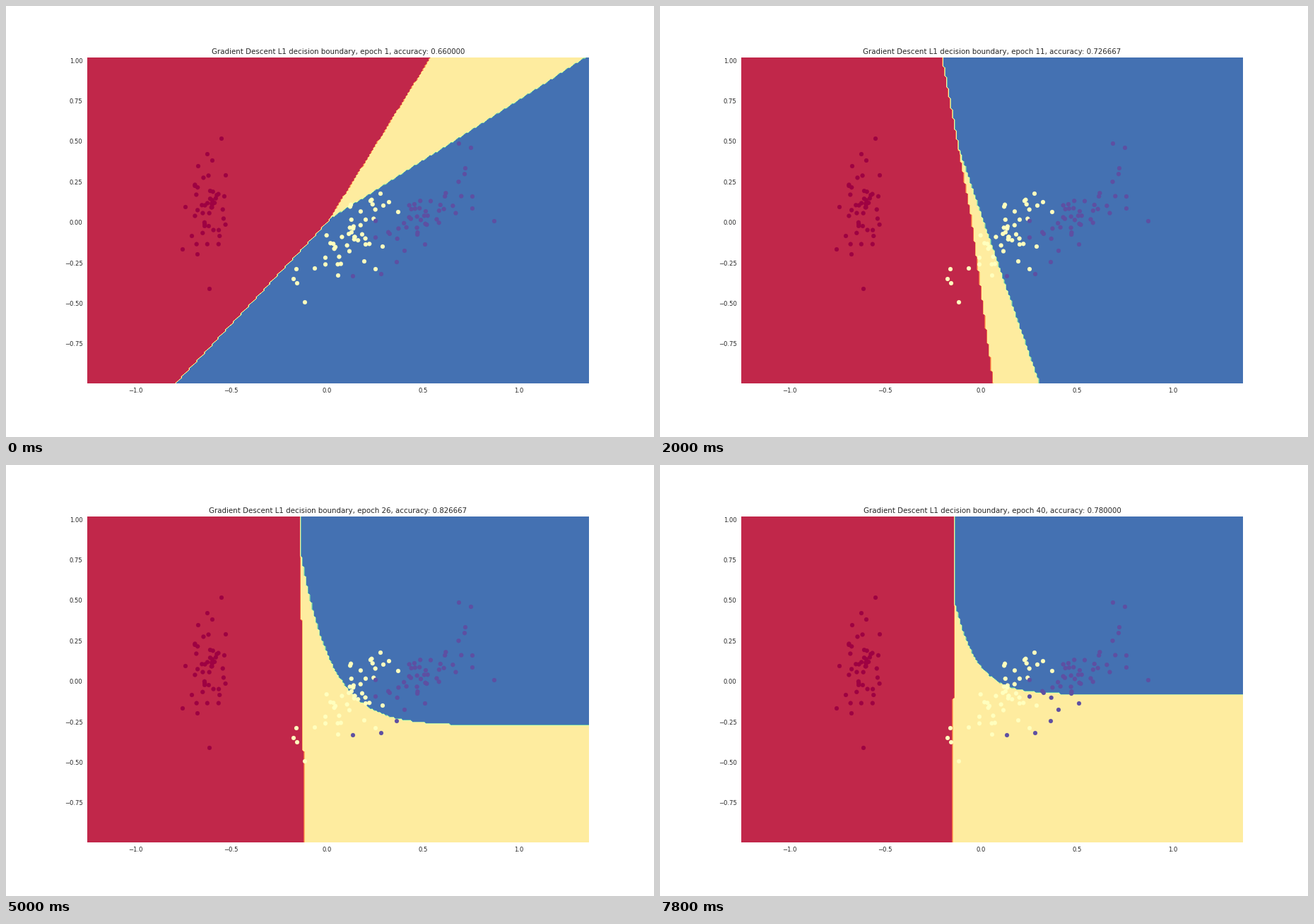
Recreate the animation shown at these times as a matplotlib script. Size 917x611 px, loop 8 s.

```python
import numpy as np
import matplotlib.pyplot as plt
from matplotlib.animation import FuncAnimation

W, H, DPI = 917, 611, 100
INK = "0.15"


def pt(px):
    return px * 72 / DPI


# Mesh in data units; the stage is ZERO + SCALE * data, y downwards
X = -1.2525 + 0.01 * np.arange(263)
Y = -0.9934 + 0.01 * np.arange(202)
LEFT, WIDTH, BOTTOM, HEIGHT = 0.125, 0.775, 0.125, 0.755
SCALE = np.array([W * WIDTH / (X[-1] - X[0]), -H * HEIGHT / (Y[-1] - Y[0])])
ZERO = np.array([W * LEFT, H * (1 - BOTTOM)]) - SCALE * [X[0], Y[0]]
MX = ZERO[0] + SCALE[0] * X
MY = ZERO[1] + SCALE[1] * Y
TOP, MIDDLE, BASE = 73, 306, 534

rng = np.random.default_rng(4)


def cluster(centre, spread, tilt, outliers, size=50):
    """A tilted Gaussian cloud plus its outlying samples, in stage pixels."""
    a, b = rng.normal(size=(2, size - len(outliers))).clip(-1.8, 1.8)
    cloud = np.column_stack([a, tilt * a + np.sqrt(1 - tilt ** 2) * b])
    return np.vstack([outliers, centre + cloud * spread])


CLASSES = [
    cluster((289, 289), (12, 27), 0, [
        (305, 188), (285, 210), (292, 219), (272, 227), (311, 240),
        (254, 285), (263, 326), (250, 345), (271, 352), (288, 401)]),
    cluster((489, 318), (25, 27), -0.65, [
        (530, 266), (542, 278), (555, 292), (533, 341), (507, 362),
        (523, 373), (437, 372), (411, 373), (407, 387), (412, 393),
        (423, 420), (470, 382)]),
    cluster((586, 296), (35, 24), -0.8, [
        (641, 195), (658, 201), (650, 230), (660, 270), (660, 287),
        (691, 305), (593, 338), (564, 347), (553, 363), (531, 380),
        (491, 383)])]

# State of the classifier at some epochs: correct samples,
# red edge at TOP, MIDDLE and BASE, blue edge at MIDDLE, its slope and bend
EPOCHS = [1, 3, 11, 17, 26, 33, 40]
STATES = np.array([
    (99, 601.5, 456, 242, 452.5, -1.6, 0.0001),
    (100, 463.7, 450.9, 437.7, 454.5, -0.0985, 0.0001),
    (109, 400, 442, 472, 459, 0.34, 0.0001),
    (115, 413.5, 429, 442.5, 473.4, 0.336, 0.002),
    (124, 416.3, 419.7, 423, 476, 0.683, 0.0159),
    (120, 417, 417, 417, 474.5, 1.093, 0.0331),
    (117, 417.8, 416, 413.5, 478, 1.667, 0.0538)])


def state(epoch):
    # Learning slows down, so epochs are spaced logarithmically
    return [np.interp(np.log(epoch), np.log(EPOCHS), s) for s in STATES.T]


def classify(red, x, slope, bend):
    red_edge = np.interp(MY, [TOP, MIDDLE, BASE], red)[:, None]
    # The blue edge bends from a line towards a horizontal asymptote
    room = 1 - bend * (MY - MIDDLE)
    curve = x - slope / bend * np.log(np.maximum(room, 1e-9))
    blue_edge = np.where(room > 0, curve, np.inf)[:, None]
    return np.where(MX < red_edge, 0, np.where(MX > blue_edge, 2, 1))


fig = plt.figure(figsize=(W / 100, H / 100), dpi=DPI, facecolor="white")
ax = fig.add_axes([LEFT, BOTTOM, WIDTH, HEIGHT])
ax.set_xlim(X[0], X[-1])
ax.set_ylim(Y[0], Y[-1])
ax.set_xticks(np.arange(-1, 1.1, 0.5))
ax.set_yticks(np.arange(-0.75, 1.1, 0.25))
ax.tick_params(length=0, pad=pt(5.94), labelsize=pt(8.49), labelcolor=INK)
for spine in ax.spines.values():
    spine.set_visible(False)

samples = (np.vstack(CLASSES) - ZERO) / SCALE
labels = np.repeat([0, 1, 2], [len(c) for c in CLASSES])
ax.scatter(*samples.T, c=labels, cmap="Spectral", s=pt(5.94) ** 2,
           linewidths=pt(0.25), zorder=3)

fills = []


def draw(i):
    epoch = i + 1
    correct, *red, x, slope, bend = state(epoch)
    if fills:
        fills.pop().remove()
    fills.append(ax.contourf(X, Y, classify(red, x, slope, bend),
                             np.linspace(0, 2, 9), cmap="Spectral"))
    ax.set_title(f"Gradient Descent L1 decision boundary, epoch {epoch}, "
                 f"accuracy: {round(correct) / 150:.6f}",
                 fontsize=pt(10.32), pad=pt(5.1), color=INK)


anim = FuncAnimation(fig, draw, frames=40, interval=200, repeat=True,
                     repeat_delay=0)
plt.show()
```
